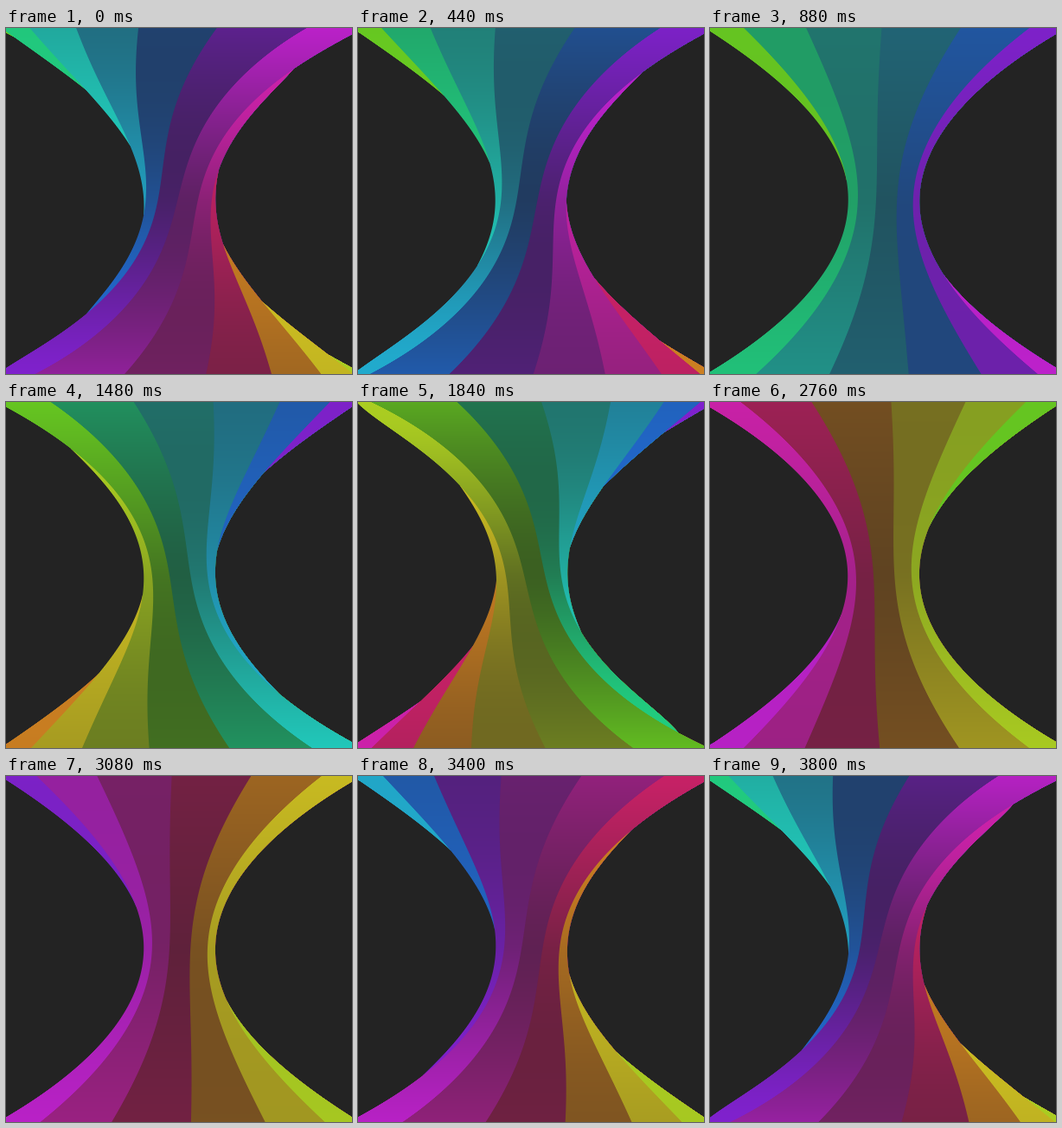
Animation, 400 px wide and 400 px high, one loop 3840 ms. Source, as an HTML page with a canvas:

```html
<!DOCTYPE html>
<html lang="en">
<head>
<meta charset="utf-8">
<title>Twisting column</title>
<style>
  html, body { margin: 0; height: 100%; overflow: hidden; background: #232323; }
  canvas { display: block; }
</style>
</head>
<body>
<canvas id="stage" width="400" height="400"></canvas>
<script>
const ctx = document.getElementById('stage').getContext('2d');
const SIZE = 400, LOOP = 3840, STEP = 40, SIDES = 12;
const CENTER_X = 200.5, WAIST = 41.5, FLARE = 0.0042;
const HUES = [33, 55, 72, 95];
const RAD = Math.PI / 180;

const hueOf = k => HUES[k % 4] + 120 * Math.floor(k / 4);

function color(hue, value) {
  const channel = offset => {
    const wave = Math.abs((hue / 60 + offset) % 6 - 3) - 1;
    return Math.round(33 + (value - 33) * Math.min(1, Math.max(0, wave)));
  };
  return `rgb(${channel(0)},${channel(4)},${channel(2)})`;
}

// Where a vertical edge of the column crosses the row dy below the waist.
function edgeAt(base, dy, twist) {
  const depth = Math.hypot(0.12, 0.0015 * dy);
  let angle = base, shrink = 1;
  for (let i = 0; i < 8; i++) {
    shrink = 1 - depth * Math.cos(angle);
    angle = base - twist * dy * shrink;
  }
  const height = dy * shrink;
  const radius = (WAIST + FLARE * height * height) / shrink;
  return { x: CENTER_X + radius * Math.sin(angle), cos: Math.cos(angle) };
}

function drawRow(y, turn, twist) {
  const dy = y + 0.5 - SIZE / 2;
  const edges = Array.from({ length: SIDES }, (_, k) =>
    edgeAt((30 * k - 273) * RAD + turn, dy, twist));
  const right = Math.max(...edges.map(e => e.x));
  edges
    .map((e, k) => {
      const next = edges[(k + 1) % SIDES];
      return { k, x: e.x, width: next.x - e.x, facing: (e.cos + next.cos) / 1.932 };
    })
    .filter(s => s.width > 0 && s.facing > -0.6)
    .sort((a, b) => a.x - b.x)
    .forEach(s => {
      const value = 95 + 0.075 * Math.abs(dy) + 95 * (1 - s.facing ** 2);
      ctx.fillStyle = color(hueOf(s.k), value);
      ctx.fillRect(s.x, y, right - s.x, 1);
    });
}

function draw() {
  const t = Math.floor(performance.now() % LOOP / STEP) * STEP;
  const turn = 2 * Math.PI * t / LOOP;
  const twist = 0.345 * RAD * Math.cos(2 * Math.PI * (t - 50) / LOOP);
  ctx.fillStyle = '#232323';
  ctx.fillRect(0, 0, SIZE, SIZE);
  for (let y = 0; y < SIZE; y++) drawRow(y, turn, twist);
  requestAnimationFrame(draw);
}
draw();
</script>
</body>
</html>
```
